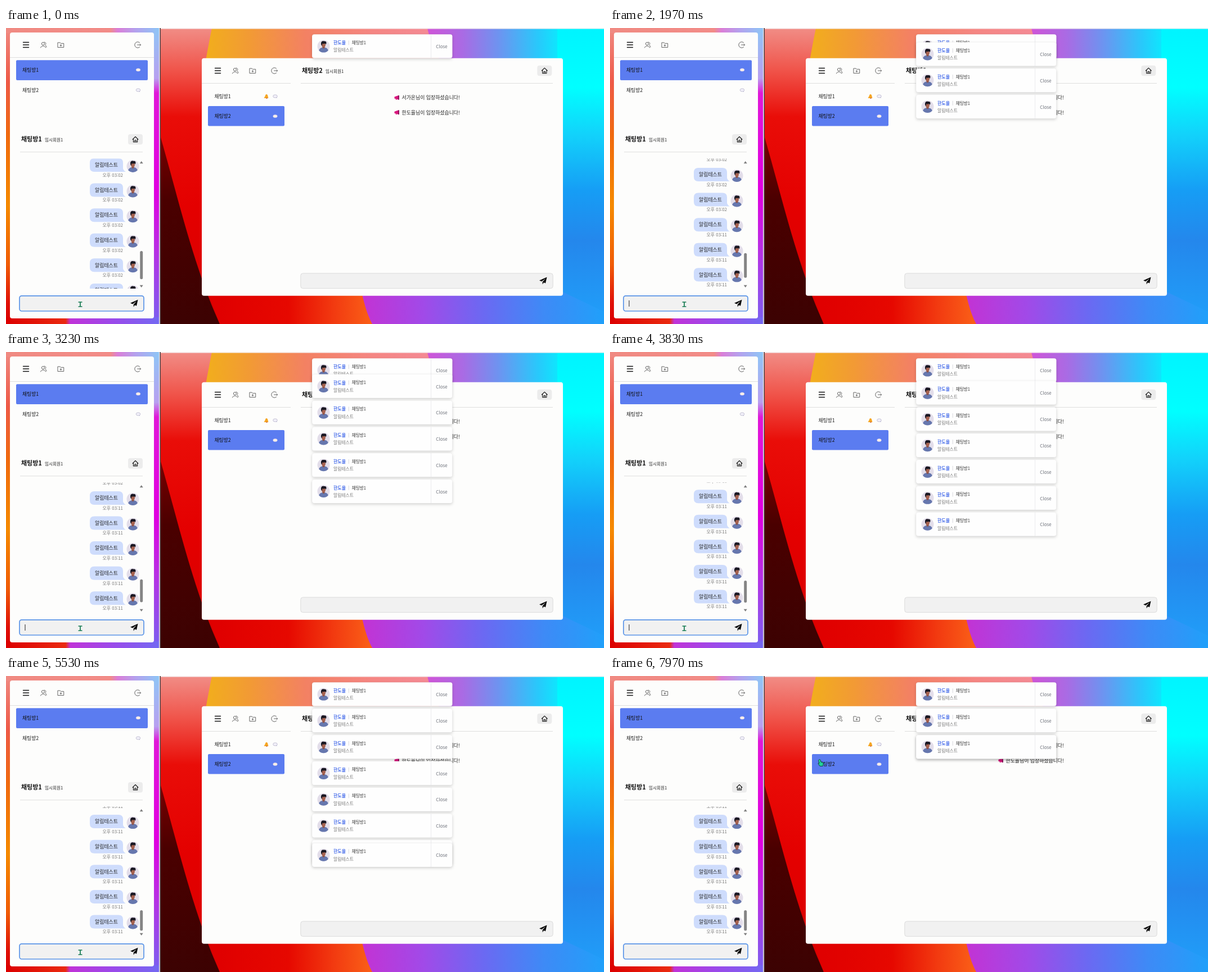
An HTML page that plays this animation: 1063x527 px, repeating every 8 s.

```html
<!DOCTYPE html>
<html lang="ko">
<head>
<meta charset="utf-8">
<style>
html, body { margin: 0; width: 100%; height: 100%; overflow: hidden; }
svg { display: block; width: 1063px; height: 527px; }
text { font-family: "Noto Sans CJK KR", "Noto Sans CJK", "Noto Sans", sans-serif; white-space: pre; }
.toast { filter: drop-shadow(0 2px 2.5px rgba(0, 0, 0, .17)); }
</style>
</head>
<body>
<svg id="stage" viewBox="0 0 1063 527" xmlns="http://www.w3.org/2000/svg"></svg>
<script>
const LOOP = 8000;
const ARRIVALS = [-259, 600, 1420, 1953, 2660, 3181, 3730, 4294, 4880];
const SHOWN = 4000, REMOVED = 5000, SLIDE = 230, TOAST_STEP = 46.8;
const ROW = 44.6, VIEW = 231, TRACK_TOP = 243.5, TRACK = 210;
const SENDER = '한도율', GUEST = '서가온', MEMBER = '임시회원1', MESSAGE = '알림테스트';

const stage = document.getElementById('stage');
const clamp = v => Math.max(0, Math.min(1, v));
const smooth = v => { v = clamp(v); return v * v * (3 - 2 * v); };

// cubic-bezier(.21, 1.02, .73, 1)
function slideEase(x) {
  if (x <= 0) return 0;
  if (x >= 1) return 1;
  let lo = 0, hi = 1;
  const curve = (u, a, b) => 3 * a * u * (1 - u) ** 2 + 3 * b * u * u * (1 - u) + u ** 3;
  for (let i = 0; i < 20; i++) {
    const mid = (lo + hi) / 2;
    if (curve(mid, .21, .73) < x) lo = mid; else hi = mid;
  }
  return curve(lo, 1.02, 1);
}

const text = (x, y, size, str, fill = '#222', extra = '') =>
  `<text x="${x}" y="${y + size * .37}" font-size="${size}" fill="${fill}" ${extra}>${str}</text>`;
const rect = (x, y, w, h, r, fill, extra = '') =>
  `<rect x="${x}" y="${y}" width="${w}" height="${h}" rx="${r}" fill="${fill}" ${extra}/>`;
const rule = (x, y, w) => rect(x, y, w, 1, 0, '#dedede');
const group = (x, y, body) => `<g transform="translate(${x} ${y})">${body}</g>`;
const line = (d, color = '#666', w = 1) =>
  `<path d="${d}" fill="none" stroke="${color}" stroke-width="${w}" stroke-linecap="round" stroke-linejoin="round"/>`;

function gradient(id, vertical, from, to, ...stops) {
  const [x2, y2] = vertical ? [0, to] : [to, 0];
  const [x1, y1] = vertical ? [0, from] : [from, 0];
  return `<linearGradient id="${id}" gradientUnits="userSpaceOnUse" x1="${x1}" y1="${y1}" x2="${x2}" y2="${y2}">` +
    stops.map(s => { const [c, o] = s.split(' '); return `<stop offset="${o}" stop-color="${c}"/>`; }).join('') +
    '</linearGradient>';
}

const defs = `<defs>
  ${gradient('red', true, 0, 527, '#f18d86 0', '#f0554b .14', '#e90d08 .3', '#e40000 .6', '#d80000 1')}
  ${gradient('dark', true, 190, 527, '#7a0000 0', '#4a0000 .35', '#3c0202 1')}
  ${gradient('amber', false, 355, 750, '#f2ae1c 0', '#f29a35 .2', '#f38163 .45', '#f58683 .75', '#f48a94 1')}
  ${gradient('violet', false, 750, 1000, '#cf55d8 0', '#a96be4 .25', '#6e93f0 .5', '#29c8fb .78', '#00f6ff 1')}
  ${gradient('sea', true, 0, 527, '#00f4ff 0', '#00ffff .2', '#12d2fb .36', '#169df5 .55', '#2487ec .72', '#20a0fa 1')}
  ${gradient('ember', false, 380, 650, '#e00000 0', '#e60800 .45', '#f23a10 .75', '#fa6018 1')}
  ${gradient('plum', false, 635, 1063, '#c233d4 0', '#a14ae8 .25', '#6b69f2 .5', '#3e8af6 .75', '#20a0fa 1')}
  ${gradient('sideTop', false, 0, 272, '#f08a82 0', '#f28c88 .68', '#da7fd8 .73', '#b3a2ee .85', '#8ec6f6 1')}
  ${gradient('sideLeft', true, 0, 527, '#f08a82 0', '#ee5a48 .18', '#f06a10 .36', '#f58a00 .6', '#f05c08 .8', '#e01008 .93', '#d80000 1')}
  ${gradient('sideRight', true, 0, 527, '#8ec6f6 0', '#b8a0f0 .17', '#e018d8 .22', '#e000e0 .55', '#b830e4 .75', '#7a60f0 1')}
  ${gradient('sideBottom', false, 0, 272, '#dc0000 0', '#ea2a10 .39', '#c033d8 .42', '#9a4aea .7', '#7468f2 1')}
  <clipPath id="listClip"><rect x="140" y="232.5" width="98" height="231.5"/></clipPath>
  <clipPath id="faceClip"><circle r="11"/></clipPath>
  <g id="avatar"><circle r="11" fill="#e3deea"/>
    <g clip-path="url(#faceClip)">
      <path d="M-9 12C-9 4-5 2 0 2S9 4 9 12Z" fill="#6677ae"/>
      <path d="M-2-1H2V3Q0 5-2 3Z" fill="#8d5044"/>
      <ellipse cy="-2.5" rx="3.4" ry="4.3" fill="#a5614f"/>
      <path d="M-4-2C-6-9-1-10 1-9C5-10 6-6 4-3L3-5Q0-4-2-5L-3-1Z" fill="#191722"/>
    </g></g>
  <g id="send"><path d="M6.5-6.5L-7-.5L-2.8 1.2L4-4L-1.3 2.2V6.5L1 3L4 4.5Z" fill="#050505"/></g>
  <g id="home">${rect(-13, -9.3, 26, 18.6, 4, '#ececec')}
    ${line('M-5 0L0-4.8L5 0M-3.6-1V4.7H3.6V-1M-1.2 4.5V1.5H1.2V4.5', '#111', 1.05)}</g>
  <g id="balloon"><ellipse rx="3.8" ry="2.6" fill="#f3f1fa" stroke="#aaa7c1" stroke-width=".7"/>
    <path d="M1 2L3 3.8L3 1.5Z" fill="#bcb9d2"/></g>
  <g id="speech"><ellipse rx="3.8" ry="2.6" fill="#fbefe9" stroke="#d9cfe8" stroke-width=".5"/></g>
  <g id="bell"><path d="M-4 3Q-2 1-1.5-1.5Q-1-4 1-3.5Q3-3 3 0L4 3Q0 4-4 3Z" fill="#f5a623"/>
    <circle cx="1" cy="3.5" r="1" fill="#c7502c"/></g>
  <g id="horn"><path d="M-4.5-1.5L2-3.8V3.4L-4.5 1.5Z" fill="#d9127d"/>
    <path d="M2-4H4V3.8H2Z" fill="#8d1c60"/><path d="M-2.5 1.5H-.5V4H-2Z" fill="#d8347f"/></g>
</defs>`;

const wallpaper =
  rect(0, 0, 272, 527, 0, 'url(#sideLeft)') +
  rect(100, 0, 172, 527, 0, 'url(#sideRight)') +
  rect(0, 0, 272, 9, 0, 'url(#sideTop)') +
  rect(0, 515, 272, 12, 0, 'url(#sideBottom)') +
  rect(272, 0, 2, 527, 0, '#f2e9ee') + rect(273.5, 0, 2, 527, 0, '#47383c') +
  rect(275, 0, 788, 527, 0, 'url(#red)') +
  '<path d="M275 195C304 295 332 420 380 527H275Z" fill="url(#dark)"/>' +
  '<path d="M366 0C362 20 358 40 354 64H800V0Z" fill="url(#amber)"/>' +
  '<path d="M380 527L360 470H700V527Z" fill="url(#ember)"/>' +
  '<path d="M749 0C753 20 764 45 775 64H1000V0Z" fill="url(#violet)"/>' +
  rect(980, 0, 83, 527, 0, 'url(#sea)') +
  '<path d="M632 470C638 495 642 510 651 527H1063V505L990 470Z" fill="url(#plum)"/>' +
  rect(275, 0, 788, 1.6, 0, '#f7f3f4');

function toolbar(x, y, exitX) {
  return group(x, y,
    line('M-5-4.5H5M-5 0H5M-5 4.5H5', '#151515', 1.35) +
    group(31, 0, '<circle cx="-.6" cy="-2" r="2.5" fill="none" stroke="#666"/>' +
      line('M-5 5C-4 1 3 1 4 5M1.5-4.8C5-5 5-1 3 .2Q5 1.5 5.5 4')) +
    group(62, 0, line('M-5.2-4H-1.5L0-2.6H5.2V4.5H-5.2ZM-1.5 1H1.5M0-.5V2.5'))) +
    group(exitX, y, line('M3.6-4A5.3 5.3 0 1 0 3.6 4M-.5 0H5.5M4-1.6L5.6 0L4 1.6'));
}

const title = (x, y, room) => text(x, y, 11, room, '#111', 'font-weight="700"') +
  text(x + 42, y + .7, 7.6, MEMBER, '#222');
const notice = (y, name) => group(695, y, '<use href="#horn"/>') +
  text(703.5, y, 8.9, `${name}님이 입장하셨습니다!`);
const use = (id, x, y) => `<use href="#${id}" x="${x}" y="${y}"/>`;

const sidePanel = rect(7, 8, 256, 509, 4, '#fdfdfc') + toolbar(35.5, 30, 234) +
  rule(7, 52, 256) + rect(18, 57.3, 234, 35.6, 2, '#5b7cf0') +
  text(29, 75, 8.8, '채팅방1', '#111') + text(29, 110.5, 8.8, '채팅방2') +
  use('speech', 235, 74.5) + use('balloon', 235, 110.5) +
  title(27, 198, '채팅방1') + use('home', 230, 198.3) + rule(25, 220.3, 218) +
  rect(24, 476.8, 221, 27.2, 4, '#f1f1f1', 'stroke="#5b95e8" stroke-width="1.7"') + use('send', 228, 490.3) +
  '<path d="M237.7 241.2L240.7 237L243.7 241.2ZM237.7 457.8L240.7 462L243.7 457.8Z" fill="#7e7e7e"/>';

const mainPanel = rect(348, 53.7, 642, 423, 4, '#fdfdfc') + toolbar(376.5, 76, 477) +
  rule(348, 98, 158) + text(370.5, 121.5, 8.8, '채팅방1') +
  use('bell', 462.5, 121.5) + use('balloon', 478.5, 121.5) +
  rect(359, 139, 136, 35.4, 2, '#5b7cf0') + text(370.5, 157, 8.8, '채팅방2', '#111') + use('speech', 478.5, 157) +
  title(526, 76, '채팅방2') + use('home', 957.3, 76) + rule(524, 98, 448) +
  notice(124, GUEST) + notice(150.3, SENDER) +
  rect(523.8, 436.8, 448.4, 26.8, 4, '#f1f1f1', 'stroke="#dcdcdc"') + use('send', 955, 450);

function bubble(index) {
  const time = index < 1 ? '오후 03:02' : '오후 03:11';
  return `<g data-row="${index}">` +
    '<path d="M157-12H200Q208-12 208-4V6Q209 10 213 12H157Q149 12 149 4V-4Q149-12 157-12Z" fill="#cedcfc"/>' +
    text(178.5, 0, 8.9, MESSAGE, '#222', 'text-anchor="middle"') +
    text(208, 18, 7.9, time, '#777', 'text-anchor="end"') + use('avatar', 225.5, 2) + '</g>';
}

const toast = () => '<g class="toast">' + rect(544, 0, 249.5, 42.5, 4, '#fefefe', 'stroke="#000" stroke-opacity=".06" stroke-width=".6"') +
  rect(755, 0, .8, 42.5, 0, '#e6e6ea') + use('avatar', 564.5, 21.3) +
  text(582, 15, 8, SENDER, '#4b70ea', 'font-weight="700"') + rect(608.8, 11, .8, 8, 0, '#d0d0d4') +
  text(614.7, 15, 7.6, '채팅방1', '#333') + text(582, 28.3, 7.8, MESSAGE, '#777') +
  text(774.5, 22, 8, 'Close', '#6b6f78', 'text-anchor="middle" font-weight="500"') + '</g>';

const rows = Array.from({ length: 15 }, (_, i) => i - 5);
stage.innerHTML = defs + wallpaper + sidePanel +
  `<g clip-path="url(#listClip)">${rows.map(bubble).join('')}</g>` +
  rect(238.2, 0, 5, 0, 2.5, '#858585', 'id="thumb"') +
  rect(33.5, 485, 1, 11, 0, '#222', 'id="caret"') + mainPanel +
  `<g id="toasts">${ARRIVALS.map(toast).reverse().join('')}</g>` +
  `<g id="cursor">
    <g>${line('M-2.8-4H2.8M0-4V4M-2.8 4H2.8', '#147a50', 1.7)}</g>
    <g><path d="M0 0V9L2.2 7L4 10.2L5.6 9.3L4 6.2H7Z" fill="#22d09a" stroke="#123f35" stroke-width=".9"/></g>
    <g><path d="M-2.5-5Q-1-6.5 0-4.5L1-1L4 0Q6 1 5 4L4 6.5H-1L-4 2Q-4 0-2 1.5L-3.5-3.5Z" fill="#22d09a" stroke="#123f35" stroke-width=".9"/></g>
  </g>`;

const rowNodes = [...stage.querySelectorAll('[data-row]')];
const toastNodes = [...document.getElementById('toasts').children].reverse();
const [thumb, caret, cursor] = ['thumb', 'caret', 'cursor'].map(id => document.getElementById(id));
const move = (node, x, y) => node.setAttribute('transform', `translate(${x} ${y})`);
const show = (node, on) => node.setAttribute('display', on ? 'inline' : 'none');

function drawToasts(t) {
  toastNodes.forEach((node, i) => {
    const age = t - ARRIVALS[i];
    show(node, age >= 0 && age < REMOVED);
    // Newer toasts push this one down; it closes up when they expire.
    const slot = ARRIVALS.slice(i + 1).reduce((sum, a) =>
      sum + slideEase((t - a) / SLIDE) - slideEase((t - a - SHOWN) / SLIDE), 0);
    move(node, 0, 11.3 + slot * TOAST_STEP);
  });
}

function drawChat(t) {
  const count = ARRIVALS.filter(a => a <= t).length;
  const scrolled = ARRIVALS.reduce((sum, a) => sum + smooth((t - a - 25) / 600), 0);
  rowNodes.forEach((node, i) => {
    show(node, rows[i] <= count);
    move(node, 0, 437.5 + (rows[i] - scrolled) * ROW);
  });
  const height = 970 + (count - 1) * ROW;
  const top = height - VIEW - (count - scrolled) * ROW;
  thumb.setAttribute('y', TRACK_TOP + TRACK * top / height);
  thumb.setAttribute('height', TRACK * VIEW / height);
  const blink = Math.floor((t - ARRIVALS[count - 1]) / 530) + (count === 1);
  show(caret, blink % 2 === 0);
}

function drawCursor(t) {
  const first = smooth((t - 6450) / 380), second = smooth((t - 6830) / 800);
  const x = 132 + 27 * first + 215 * second;
  const y = 492 - 47 * first - 291 * second;
  const overInput = y > 477;
  const overRoom = x > 359 && y < 174;
  [overInput, !overInput && !overRoom, overRoom].forEach((on, i) => show(cursor.children[i], on));
  move(cursor, x, y);
}

function render(t) {
  drawToasts(t);
  drawChat(t);
  drawCursor(t);
}

const start = performance.now();
function tick() {
  render((performance.now() - start) % LOOP);
  requestAnimationFrame(tick);
}
render(0);
requestAnimationFrame(tick);
</script>
</body>
</html>
```
